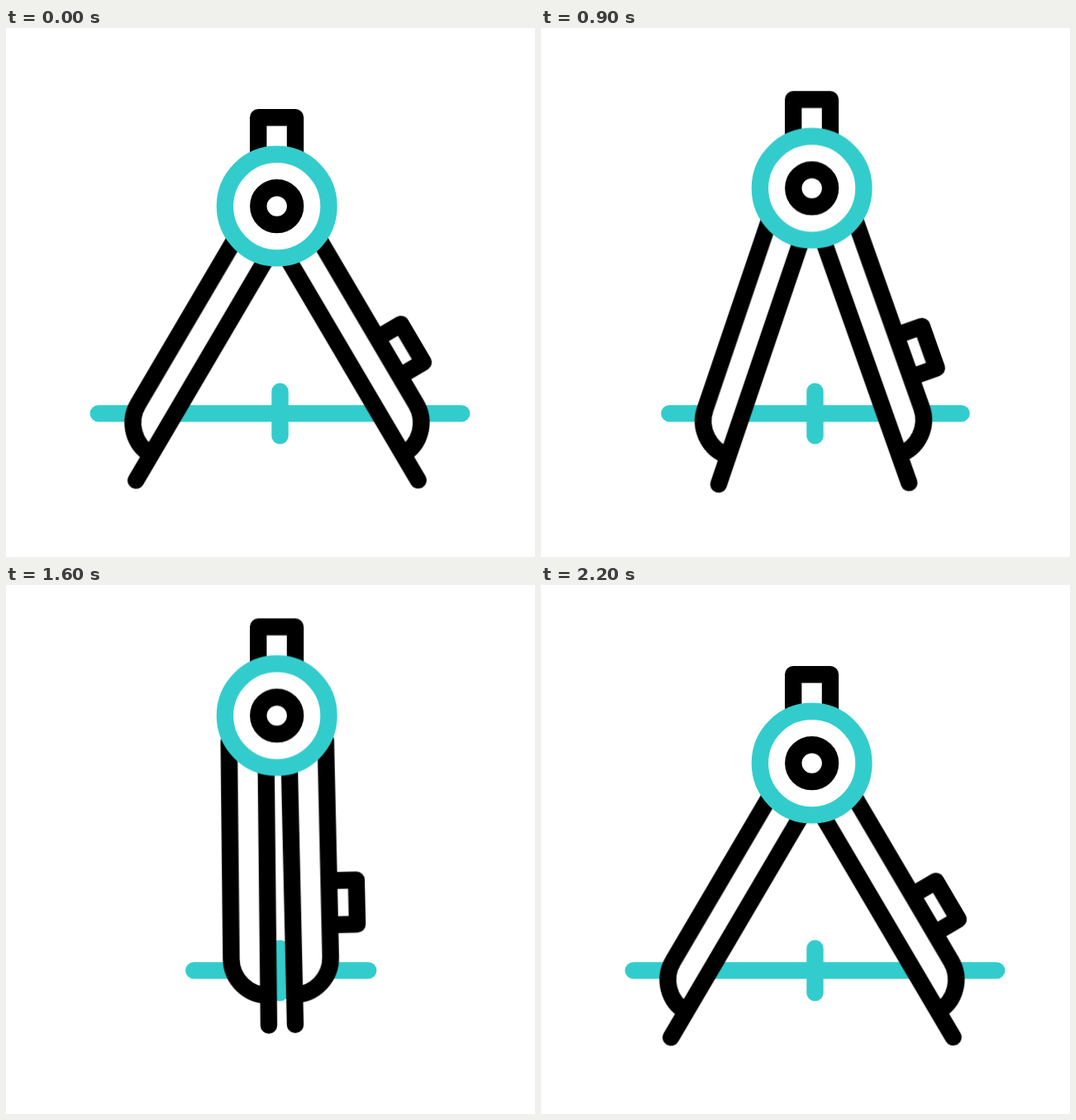
Recreate the animation shown at these times as an HTML page without scripts. Size 640 by 640 pixels, loop 2.4 s.

```html
<!DOCTYPE html>
<html lang="en">
<head>
<meta charset="utf-8">
<title>Drawing compass</title>
<style>
  html, body { margin: 0; width: 100%; height: 100%; overflow: hidden; background: #fff; }
  svg { display: block; width: 100%; height: 100%; }

  .ink, .teal { fill: #fff; stroke: #000; stroke-width: 20.4; stroke-linecap: round; stroke-linejoin: round; }
  .teal { stroke: #3cc; }

  .body, .left, .right, .base {
    animation: 2.4s cubic-bezier(.3333, 0, .6667, 1) infinite;
  }
  .body { animation-name: lift; }
  .left { animation-name: close-left; }
  .right { animation-name: close-right; }
  .base { animation-name: shrink; }

  /* open until 400 ms, closed at 1600 ms, open again at 2200 ms */
  @keyframes lift {
    0%, 16.6667%, 91.6667%, 100% { transform: translateY(0); }
    66.6667% { transform: translateY(-57.6px); }
  }
  @keyframes close-left {
    0%, 16.6667%, 91.6667%, 100% { transform: rotate(30.45deg); }
    66.6667% { transform: rotate(-.6deg); }
  }
  @keyframes close-right {
    0%, 16.6667%, 91.6667%, 100% { transform: rotate(-30.5deg); }
    66.6667% { transform: rotate(-1.3deg); }
  }
  @keyframes shrink {
    0%, 16.6667%, 91.6667%, 100% { d: path("M111.8 466.4L551.2 466.4"); }
    66.6667% { d: path("M227.3 466.4L438.2 466.4"); }
  }
</style>
</head>
<body>
<svg viewBox="0 0 640 640">
  <defs>
    <path id="leg" d="M-44.6 -33V230A44.6 44.6 0 0 0 0 274.6V0M0 0V310.7"/>
  </defs>

  <g class="teal">
    <path class="base" d="M111.8 466.4L551.2 466.4"/>
    <path d="M331.5 439.8V493.4"/>
  </g>

  <g class="body">
    <g class="ink">
      <g transform="translate(314.7 279.5)">
        <g class="left"><use href="#leg"/></g>
      </g>
      <g transform="translate(343 282.8)">
        <g class="right">
          <path d="M43.8 133.5H77.8V187H43.8"/>
          <use href="#leg" transform="translate(0 -3.9) scale(-1 1)"/>
        </g>
      </g>
      <path d="M305.2 152V108.2H350V152"/>
    </g>
    <circle class="teal" cx="327.7" cy="215.6" r="62.8"/>
    <circle class="ink" cx="327.7" cy="215.6" r="22.4"/>
  </g>
</svg>
</body>
</html>
```
